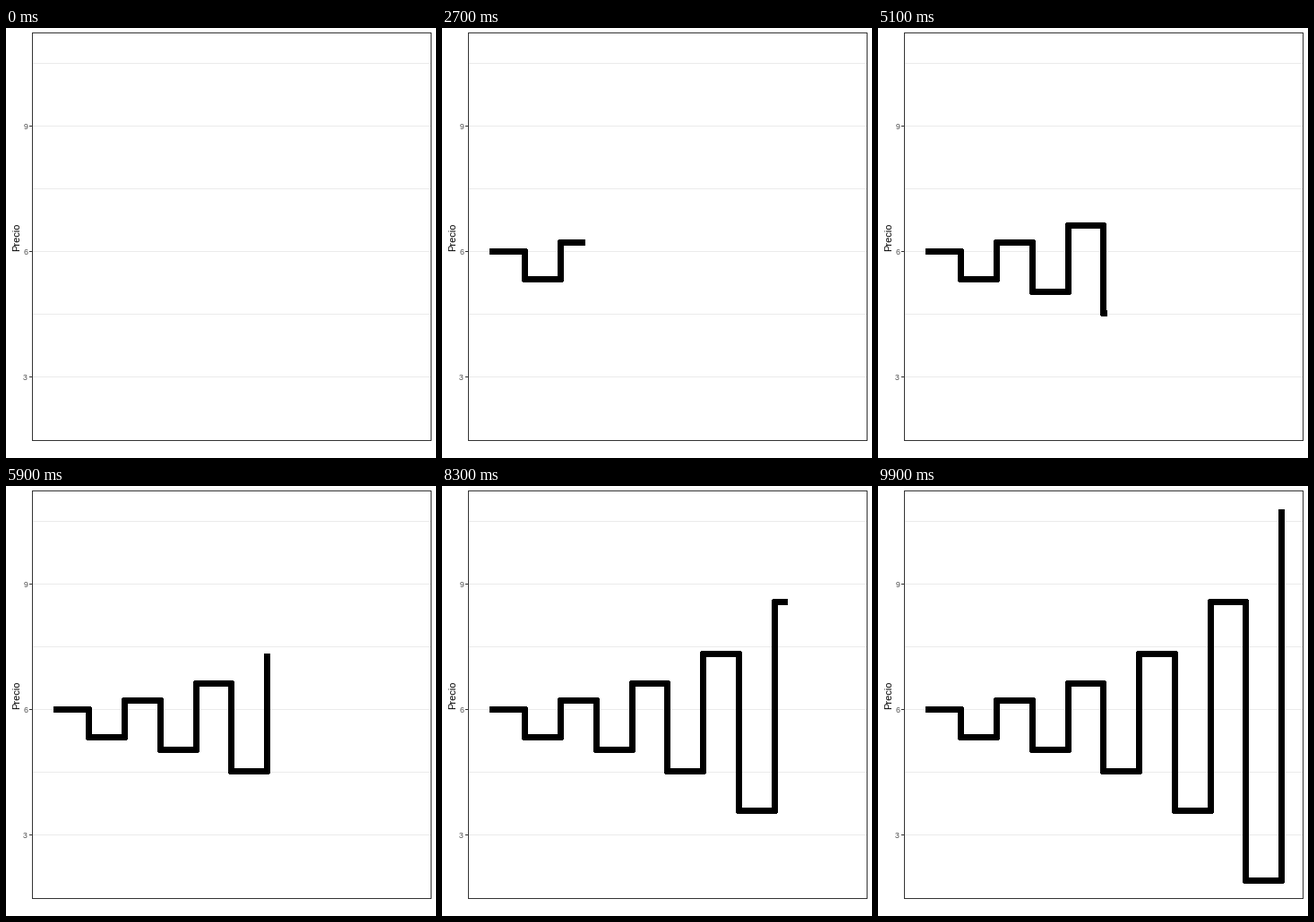
A matplotlib script for the animation above (10 s loop, 480 px wide and 480 px high).

```python
import numpy as np
import matplotlib.pyplot as plt
from matplotlib.animation import FuncAnimation
from matplotlib.patches import Rectangle

SIZE, DPI, FRAMES = 480, 80, 100
PT = 72 / DPI                      # points per pixel
STEPS = 10
UNIT = 140 / 3                     # pixels per price unit

plt.rcParams.update({"font.family": "Liberation Sans", "path.simplify": False})

# Cobweb prices: swings alternate and grow by 4/3 each period.
swings = -2 / 3 * (-4 / 3) ** np.arange(STEPS)
prices = 6 + np.concatenate([[0], np.cumsum(swings)])


def price_y(p):
    return np.floor(249.45 - (p - 6) * UNIT)


xs = 53 + 39.75 * np.arange(STEPS + 1)
ys = price_y(prices)
key_frames = np.round(np.linspace(0, FRAMES - 1, STEPS + 1)).astype(int)

fig = plt.figure(figsize=(SIZE / DPI, SIZE / DPI), dpi=DPI, facecolor="white")
ax = fig.add_axes([0, 0, 1, 1])
ax.set_xlim(0, SIZE)
ax.set_ylim(SIZE, 0)
ax.axis("off")


def bar(x, y, w, h, color, z):
    ax.add_patch(Rectangle((x, y), w, h, fc=color, lw=0, aa=False, zorder=z))


# Grid and axis
for p in np.arange(3, 10.6, 1.5):
    y = price_y(p)
    bar(30, y, 444, 1, "#EBEBEB", 1)
    if p % 3 == 0:
        bar(26, y, 3, 1, "#333333", 3)
        ax.text(24, y + 4.4, f"{p:.0f}", size=8.8 * PT, color="#4D4D4D",
                ha="right", va="baseline")
ax.text(15, 233.5, "Precio", size=11 * PT, color="black", rotation=90,
        rotation_mode="anchor", ha="center", va="baseline")

# Panel border
for x in (29, 474):
    bar(x, 5, 1, 456, "#333333", 3)
for y in (5, 460):
    bar(29, y, 446, 1, "#333333", 3)

line, = ax.plot([], [], color="black", lw=7 * PT, solid_capstyle="butt",
                solid_joinstyle="round", aa=False, snap=False, zorder=2)


def trace(frame):
    """Staircase up to this frame; vertical moves happen at once."""
    if frame == 0:
        return [], []
    k = np.searchsorted(key_frames, frame, side="right") - 1
    px, py = [53], [ys[0] + 0.5]
    for i in range(1, k + 1):
        x = np.floor(xs[i]) + 0.5
        px += [x, x]
        py += [ys[i - 1] + 0.5, ys[i] + 0.5]
    if frame == key_frames[k]:
        py[-1] = ys[k]
    else:
        px.append(np.floor(np.interp(frame, key_frames, xs)))
        py.append(ys[k] + 0.5)
    return px, py


def update(frame):
    line.set_data(*trace(frame))
    return line,


anim = FuncAnimation(fig, update, frames=FRAMES, interval=100,
                     init_func=lambda: update(0), repeat=True)
plt.show()
```
